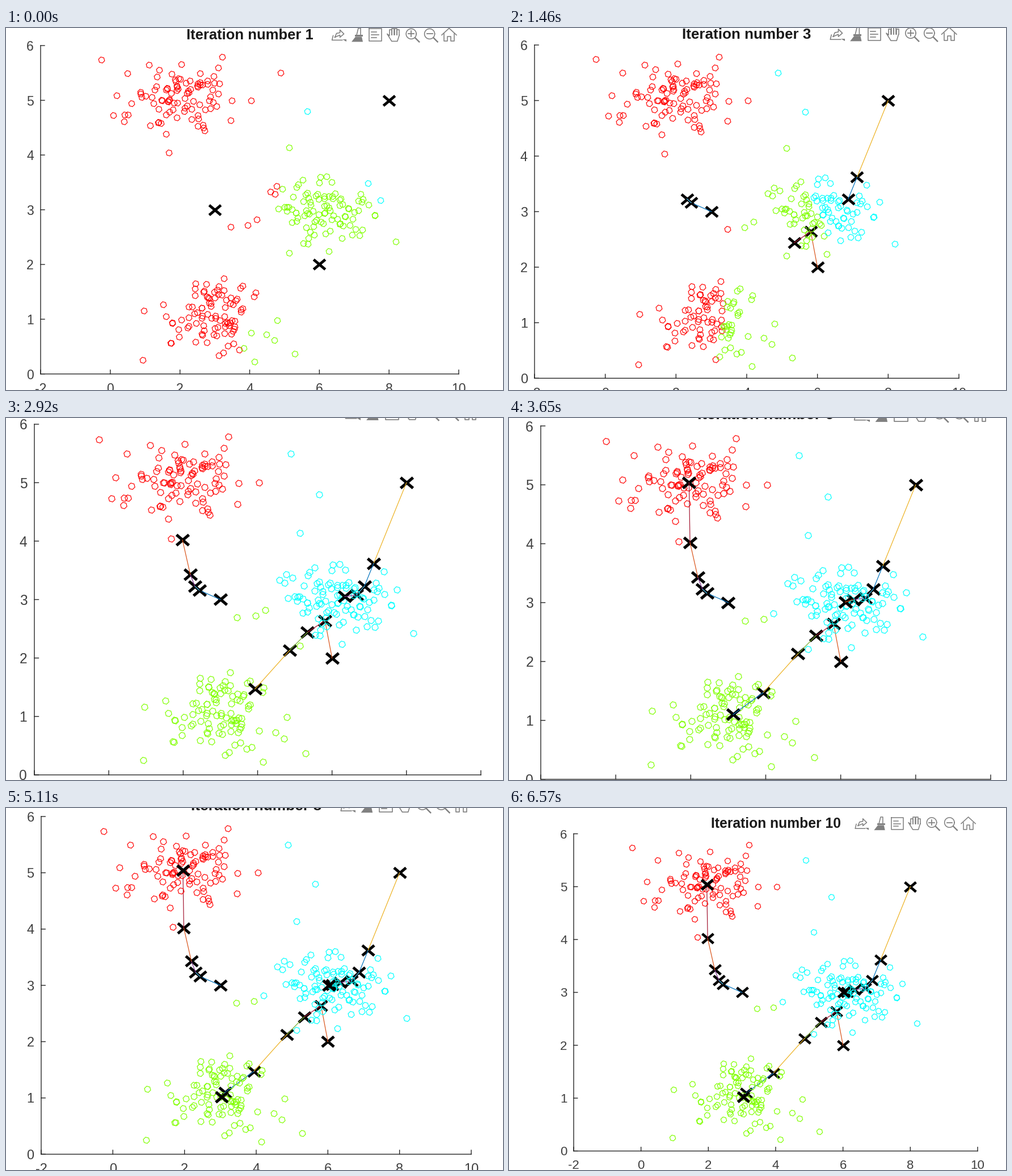
Write a matplotlib script that moves like this. It is 876x639 px and loops after 7300 ms.

```python
import numpy as np
import matplotlib.pyplot as plt
from matplotlib.animation import FuncAnimation
from matplotlib.path import Path

W, H, DPI = 876, 639, 100
PT = 72 / DPI
STEPS, STEP_MS = 10, 730
ASPECT = .7865
INK, LABEL, ICON = "#262626", "#404040", "#808080"
GROUPS = ["#ff0000", "#80ff00", "#00ffff"]
LINES = ["#0072bd", "#d95319", "#edb120", "#7e2f8e", "#77ac30", "#4dbeee", "#a2142f"]

# The plot area shifts at each step: left, width and top in pixels
VIEWS = [(61, 737, 31), (66, 741, 31), (45, 748, 30), (49, 788, 9), (50, 787, 11),
         (56, 793, 14), (77, 753, 13), (62, 758, 15), (53, 767, 16), (114, 712, 45.5)]

# Centroid paths; each rests at its last place
PATHS = [
    [(3, 3), (2.43, 3.16), (2.31, 3.23), (2.19, 3.43), (1.98, 4.02), (1.955, 5.04)],
    [(6, 2), (5.81, 2.64), (5.34, 2.44), (4.86, 2.13), (3.93, 1.47), (3.13, 1.10),
     (3.04, 1.02)],
    [(8, 5), (7.12, 3.62), (6.87, 3.23), (6.66, 3.08), (6.34, 3.05), (6.12, 3.01),
     (6.03, 3.0)],
]

# Stray points far from every cloud
STRAYS = [(-.26, 5.74), (.08, 4.73), (3.21, 5.79), (4.04, 5.0), (1.68, 4.04),
          (4.89, 5.5), (5.65, 4.8), (5.13, 4.14), (3.45, 2.69), (3.94, 2.72),
          (4.2, 2.82), (4.59, 3.33), (8.19, 2.42), (7.75, 3.17), (7.39, 3.48),
          (5.13, 2.21), (6.27, 2.24), (.93, .25), (.96, 1.16), (3.26, 1.75),
          (4.71, .62), (5.29, .37), (4.14, .22)]

rng = np.random.default_rng(12)


def cloud(center, spread, count=92):
    """Normal cloud without its far tails."""
    z = rng.normal(size=(400, 2))
    z = z[np.hypot(z[:, 0], z[:, 1]) < 2.1][:count]
    return np.array(center) + z * spread


SPREADS = [(.93, .34), (.88, .33), (.82, .31)]
points = np.vstack([STRAYS] + [cloud(p[-1], s) for p, s in zip(PATHS, SPREADS)])

CROSS = Path([(-1, -.85), (1, .85), (-1, .85), (1, -.85)],
             [Path.MOVETO, Path.LINETO] * 2)

fig = plt.figure(figsize=(W / DPI, H / DPI), dpi=DPI, facecolor="white")
ax = fig.add_axes([0, 0, 1, 1])


def centroid(group, step):
    path = PATHS[group]
    return path[min(step, len(path) - 1)]


def nearest(step):
    centers = np.array([centroid(g, step) for g in range(3)])
    return np.linalg.norm(points[:, None] - centers, axis=2).argmin(axis=1)


def stroke(xs, ys, color, width, **kw):
    ax.plot(xs, ys, color=color, lw=width * PT, **kw)


def draw_toolbar(right, top, s):
    cy = top - 18.6 * s

    def pen(cx):
        def line(pts, width=1.6):
            p = np.array(pts, float) * s
            stroke(cx + p[:, 0], cy + p[:, 1], ICON, width * s)
        return line

    def fill(cx, pts):
        p = np.array(pts, float) * s
        ax.fill(cx + p[:, 0], cy + p[:, 1], color=ICON, lw=0)

    share, brush, note, hand, zoom_in, zoom_out, home = [
        right - (17 + 32.4 * k) * s for k in range(6, -1, -1)]

    line = pen(share)
    line([(-7, 4), (-4, -3), (2, -4), (2, -9), (9, -2), (2, 4), (2, 0), (-7, 4)])
    line([(-10, 1), (-12, 9), (6, 9)])
    fill(share, [(6, 8), (13, 8), (13, 12)])

    line = pen(brush)
    line([(-1, 0), (2, -12), (6, -12), (6, 0)])
    line([(-3, 1), (8, 1)], 3)
    fill(brush, [(-3, 3), (8, 3), (10, 12), (-10, 12)])

    line = pen(note)
    line([(-11, -11), (11, -11), (11, 11), (-11, 11), (-11, -11)])
    for y, x in ((-5, 2), (0, 6), (5, 2)):
        line([(-7, y), (x, y)])

    # Four fingers, then thumb and palm
    line = pen(hand)
    for k in range(4):
        x, tip = -8 + 4.5 * k, -9 - 3 * np.sin(np.pi * k / 3)
        line([(x, 0), (x, tip), (x + 4, tip), (x + 4, 0)])
    line([(-8, 1), (-12, -2), (-4, 11), (6, 11), (9.5, 0)])

    t = np.linspace(0, 2 * np.pi, 40)
    ring = np.column_stack([np.cos(t), np.sin(t)]) * 9 - 2
    for cx in (zoom_in, zoom_out):
        line = pen(cx)
        line(ring)
        line([(5, 5), (12, 12)], 2.4)
        line([(-7, -2), (3, -2)], 1.8)
    pen(zoom_in)([(-2, -7), (-2, 3)], 1.8)

    line = pen(home)
    line([(-13, 0), (0, -12), (13, 0)])
    line([(-9, -2), (-9, 11), (-3, 11), (-3, 3), (3, 3), (3, 11), (9, 11), (9, -2)])


def draw(step):
    ax.clear()
    ax.set_xlim(0, W)
    ax.set_ylim(H, 0)
    ax.axis("off")
    left, width, top = VIEWS[step]
    right, bottom = left + width, top + width * ASPECT
    s = width / 737

    def px(x):
        return left + (np.asarray(x) + 2) * width / 12

    def py(y):
        return bottom - np.asarray(y) * (bottom - top) / 6

    def label(x, y, text, size, **kw):
        ax.text(x, y, text, fontsize=size * s * PT, family="Liberation Sans", **kw)

    def axis_line(xs, ys):
        stroke(xs, ys, INK, 1.4, snap=False)

    axis_line([left, left, right], [top, bottom, bottom])
    for v in range(-2, 11, 2):
        axis_line([px(v)] * 2, [bottom, bottom - 7 * s])
        label(px(v), bottom + 24 * s, str(v), 23, color=LABEL, ha="center",
              va="center_baseline")
    for v in range(7):
        axis_line([left, left + 7 * s], [py(v)] * 2)
        label(left - 12 * s, py(v), str(v), 23, color=LABEL, ha="right",
              va="center_baseline")
    label((left + right) / 2, top - 11 * s, f"Iteration number {step + 1}", 25.6,
          color="#1a1a1a", weight="bold", ha="center", va="baseline")
    draw_toolbar(right, top, s)

    def crosses(k):
        for g in range(3):
            x, y = centroid(g, k)
            ax.plot(px(x), py(y), marker=CROSS, ms=20.5 * s * PT, mec="black",
                    mew=4.8 * s * PT, mfc="none", ls="none")
        if k:
            for g in range(3):
                a, b = centroid(g, k - 1), centroid(g, k)
                stroke(px([a[0], b[0]]), py([a[1], b[1]]),
                       LINES[(5 * (k - 1) + g) % 7], 1.2)

    # Older crosses lie under the points, the newest on top
    for k in range(step):
        crosses(k)
    group = nearest(step)
    for g, color in enumerate(GROUPS):
        p = points[group == g]
        ax.plot(px(p[:, 0]), py(p[:, 1]), ls="none", marker=(6, 0, 15),
                ms=11 * s * PT, mec=color, mew=1.2 * PT, mfc="none")
    crosses(step)
    return []


def reset():
    return draw(0)


anim = FuncAnimation(fig, draw, frames=STEPS, init_func=reset, interval=STEP_MS,
                     repeat=True, repeat_delay=0, blit=False)
plt.show()
```
